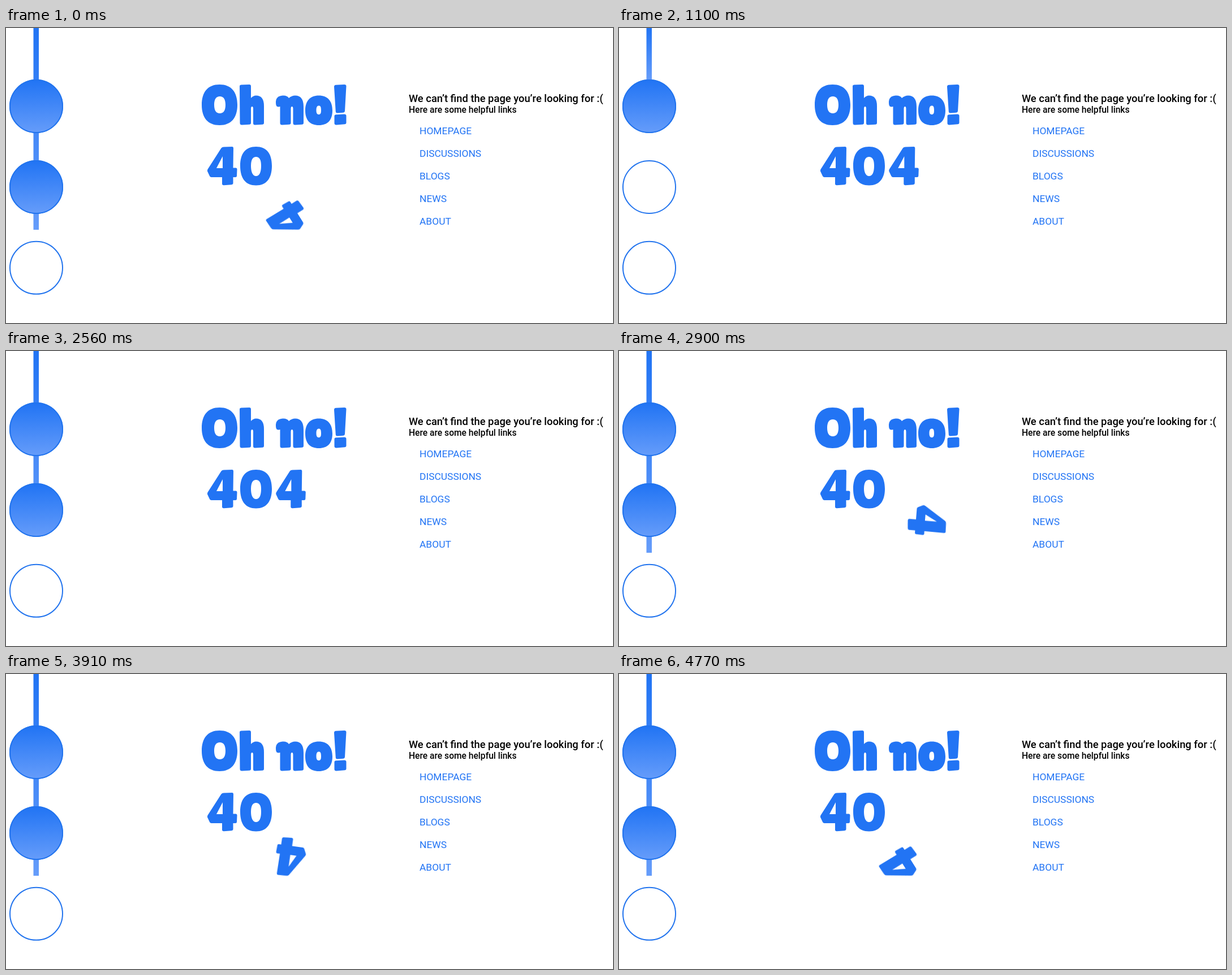
These frames come from a looping animation (1073 px wide and 522 px high, 5230 ms). An HTML page:

```html
<!DOCTYPE html>
<html lang="en">
<head>
<meta charset="utf-8">
<title>Page not found</title>
<style>
  html, body { margin: 0; width: 100%; height: 100%; overflow: hidden; background: #fff; }
  svg { display: block; width: 1073px; height: 522px; }
  svg * { animation: 5230ms linear infinite; }

  .blue { fill: #2274f4; }
  .ring { fill: #fff; stroke: #2274ee; stroke-width: 2; }
  .ball { fill: url(#fade); stroke: #2274ee; stroke-width: 2; }
  .line { fill: url(#fade); }
  text { font-family: Roboto, "Open Sans", sans-serif; }
  .lead { font-size: 18.35px; font-weight: 500; }
  .sub { font-size: 15.6px; font-weight: 500; }
  .links { font-size: 17.4px; fill: #2274f4; }

  .page { animation-name: reload; animation-timing-function: step-end; }
  .line { animation-name: grow; }
  .first { animation-name: fill-first; animation-timing-function: step-end; }
  .second { animation-name: fill-second; animation-timing-function: step-end; }
  .loose { transform-origin: 504px 285px; animation-name: tumble; }

  @keyframes reload {
    0%, 16.06% { visibility: visible; }
    13.19% { visibility: hidden; }
  }
  @keyframes grow {
    0%, 14% { transform: scaleY(1); }
    14.01%, 16.06% { transform: scaleY(0); }
    21% { transform: scaleY(.255); }
    34.4% { transform: scaleY(.521); }
    39.2% { transform: scaleY(.658); }
    48.95% { transform: scaleY(.919); }
    51.6%, 100% { transform: scaleY(1); }
  }
  @keyframes fill-first {
    0%, 20.9% { opacity: 1; }
    14% { opacity: 0; }
  }
  @keyframes fill-second {
    0%, 39.1% { opacity: 1; }
    14% { opacity: 0; }
  }
  /* tips off the baseline, swings upside down, then drops onto its side */
  @keyframes tumble {
    0%, 14% { transform: translate(28.5px, 31px) rotate(238deg); }
    14.01%, 49% { transform: translate(0, 0) rotate(0deg); }
    52.2% { transform: translate(0, 5px) rotate(45deg); }
    55.45% { transform: translate(0, 12px) rotate(94.5deg); }
    58.9% { transform: translate(0, 7px) rotate(123deg); }
    66.16% { transform: translate(0, 0) rotate(168deg); }
    69.6% { transform: translate(2px, -1px) rotate(177deg); }
    74.76% { transform: translate(4px, -1.5px) rotate(188deg); }
    80.7% { transform: translate(4px, -1px) rotate(190deg); animation-timing-function: ease-in-out; }
    91.2%, 100% { transform: translate(28.5px, 31px) rotate(238deg); }
  }
</style>
</head>
<body>
<svg viewBox="0 0 1073 522">
  <defs>
    <linearGradient id="fade" x1="0" y1="0" x2="0" y2="1">
      <stop offset="0" stop-color="#2174f4"/>
      <stop offset="1" stop-color="#659cfa"/>
    </linearGradient>
    <path id="four" fill-rule="evenodd" d="M380.500 212.500Q382 210.700 385 210.500L400 210Q402 210 402 212.500L401.500 247.500H406.500Q408.500 247.500 408.500 250L408 262Q408 264 405.500 264H401.500V275Q401.300 277 398.500 277.300L385 278.300Q382 278.300 382 275.500V264H363Q361 264 360 262L356 253.500Q355.500 252 356.500 250ZM383 227V248H372Z"/>
  </defs>

  <g class="page">
    <rect class="line" x="48.500" width="9.500" height="357"/>
    <circle class="ring" cx="53.500" cy="138.500" r="46.500"/>
    <circle class="ring" cx="53.500" cy="281.500" r="46.500"/>
    <circle class="ring" cx="53.500" cy="424.300" r="46.500"/>
    <circle class="ball first" cx="53.500" cy="138.500" r="46.500"/>
    <circle class="ball second" cx="53.500" cy="281.500" r="46.500"/>

    <g class="blue" fill-rule="evenodd" role="img" aria-label="Oh no!">
      <path d="M377.500 100C398 100 409 113 409 136S398 172 377.500 172 346 159 346 136 357 100 377.500 100ZM378 121C371.500 121 368 126 368 136S371.500 151 378 151 388 146 388 136 384.500 121 378 121Z"/>
      <path d="M413 103Q413 100.500 416 100.500L430 100Q433 100 433 103V124Q437 119.500 442 119.500 456 119.500 456 138V168Q456 170.500 453 170.700L440 171.500Q437 171.500 437 168.500V143Q437 139 435 139 433 139 433 143V168Q433 170.500 430 170.700L417 171.500Q413.500 171.500 413.500 168Z"/>
      <path d="M477 133Q476 120.500 489 119.500 497 119 500 124 505 119.500 511 119.500 526 119.500 526 139V168Q526 170.500 523 170.700L511 171.500Q507.500 171.500 507.500 168V143Q507.500 139 505.500 139 503.500 139 503.500 143V168Q503.500 170.500 500.500 170.700L488 171.500Q484.500 171.500 484.500 168V139Q481 140 478.500 138.500 477 137 477 133Z"/>
      <path d="M553 119.500C568.500 119.500 577 129 577 146S568.500 172 553 172 529 163 529 146 537.500 119.500 553 119.500ZM553 137.500C550 137.500 548.500 140 548.500 145.500S550 153 553 153 557 151 557 145.500 556 137.500 553 137.500Z"/>
      <path d="M580 104Q580 101 583 100.800L598 100Q601.500 100 601.500 103L599 147Q598.800 149.500 596 149.700L586 150.500Q583 150.500 582.800 148ZM580.500 156Q580.500 153.500 583.500 153.300L598 152.500Q601.500 152.500 601.500 155.500V167.500Q601.500 170 598.500 170.300L584 171.500Q580.500 171.500 580.500 168.500Z"/>
    </g>

    <g class="blue" role="img" aria-label="404">
      <use href="#four"/>
      <path fill-rule="evenodd" d="M442 210C460.500 210 470 222 470 244S460.500 278.500 442 278.500 414 266 414 244 423.500 210 442 210ZM442 228C436 228 433 233.500 433 244S436 262 442 262 451 255 451 244 448 228 442 228Z"/>
      <g class="loose"><use href="#four" x="121.300"/></g>
    </g>

    <text class="lead" x="712" y="130.500">We can’t find the page you’re looking for :(</text>
    <text class="sub" x="712" y="149.500">Here are some helpful links</text>
    <g class="links">
      <text x="731" y="188.300">HOMEPAGE</text>
      <text x="731" y="228.300">DISCUSSIONS</text>
      <text x="731" y="268.300">BLOGS</text>
      <text x="731" y="308.300">NEWS</text>
      <text x="731" y="348.300">ABOUT</text>
    </g>
  </g>
</svg>
</body>
</html>
```
